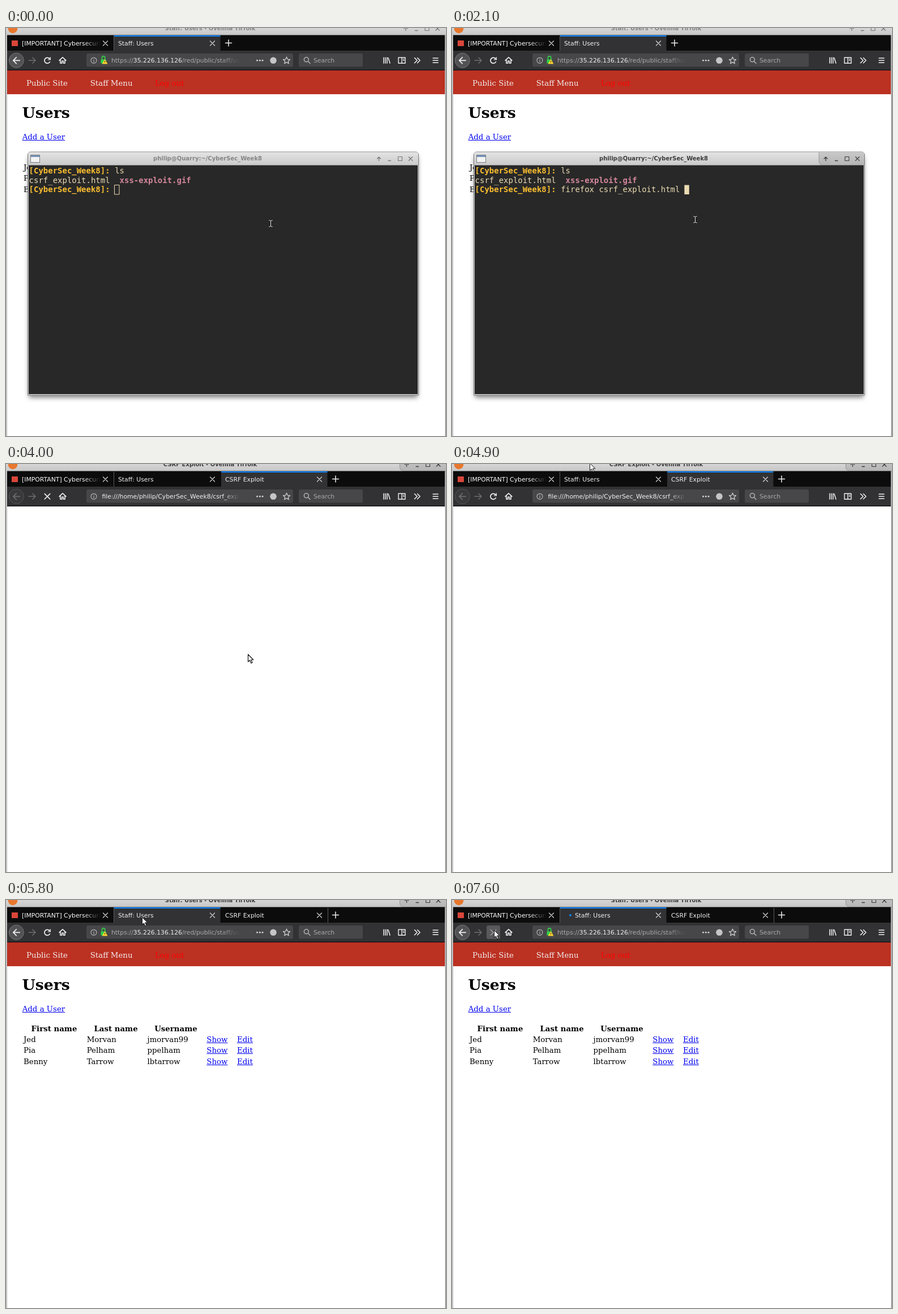
An HTML page with a canvas that plays this animation: 777 by 721 pixels, repeating every 8 s.

```html
<!DOCTYPE html>
<html lang="en">
<head>
<meta charset="utf-8">
<title>Desktop session</title>
<style>
html, body { margin: 0; width: 100%; height: 100%; overflow: hidden; background: #fff; }
canvas { display: block; width: 777px; height: 721px; }
</style>
</head>
<body>
<canvas id="stage" width="777" height="721"></canvas>
<script>
const c = document.getElementById('stage').getContext('2d');
const LOOP = 8000;
const UI = '10.83px "DejaVu Sans", sans-serif';
const TITLE = 'bold 10px "DejaVu Sans", sans-serif';
const SERIF = '13.33px "DejaVu Serif", serif';
const MONO = '13.98px "DejaVu Sans Mono", monospace';
const BRAND = 'Ovelina Tirfolk';
const FOLDER = '/home/philip/CyberSec_Week8';
const COMMAND = 'firefox csrf_exploit.html ';
const LIGHT = '#f0f0f1', DIM = '#6c6c6f', BLUE = '#0a84ff';
const CELL = 8.42;

// Each list holds [start time, value...]; a value lasts until the next entry.
const typed = [[0, 0], [1100, 2], [1400, 5], [1600, 22], [2100, 26]];
const pointer = [
  [0, 427, 336], [4300, 427, 323], [4500, 416, 304], [4600, 404, 281],
  [4800, 330, 143], [4900, 243, -2], [5100, 240, -3], [5300, 240, 5],
  [5400, 240, 13], [5700, 240, 30], [6100, 181, 64], [6200, 131, 91],
  [6600, 81, 61], [6800, 74, 53]
];

function at(list, t) {
  let hit = list[0];
  for (const row of list) if (t >= row[0]) hit = row;
  return hit;
}

function rect(x, y, w, h, color) {
  c.fillStyle = color;
  c.fillRect(x, y, w, h);
}

function round(x, y, w, h, r, color, stroke) {
  c.beginPath();
  c.roundRect(x, y, w, h, r);
  if (color) { c.fillStyle = color; c.fill(); }
  if (stroke) { c.lineWidth = 1; c.strokeStyle = stroke; c.stroke(); }
}

function circle(x, y, r, color) {
  c.beginPath();
  c.arc(x, y, r, 0, 7);
  c.fillStyle = color;
  c.fill();
}

// Strokes an SVG path placed at x, y.
function icon(d, x, y, color, width = 1.5) {
  c.save();
  c.translate(x, y);
  c.strokeStyle = color;
  c.lineWidth = width;
  c.lineJoin = c.lineCap = 'round';
  c.stroke(new Path2D(d));
  c.restore();
}

function vertical(y0, y1, ...colors) {
  const g = c.createLinearGradient(0, y0, 0, y1);
  colors.forEach((col, i) => g.addColorStop(i / (colors.length - 1), col));
  return g;
}

function fade(x0, x1, rgb) {
  const g = c.createLinearGradient(x0, 0, x1, 0);
  g.addColorStop(0, `rgba(${rgb},1)`);
  g.addColorStop(1, `rgba(${rgb},0)`);
  return g;
}

// Draws text and returns where it ends.
function text(s, x, y, font, color, align = 'left') {
  c.font = font;
  c.fillStyle = color;
  c.textAlign = align;
  c.fillText(s, x, y);
  return x + c.measureText(s).width;
}

function link(s, x, y) {
  const end = text(s, x, y, SERIF, '#0000ee');
  rect(x, Math.round(y) + 1, end - x, 1, '#0000ee');
}

function windowButtons(x, y, focused) {
  const ink = focused ? '#3c3c3c' : '#777';
  if (focused) {
    round(x - 10.5, y - 14, 90, 25.5, [0, 0, 0, 7], vertical(y - 12, y + 12, '#c9c9c9', '#b4b4b4'), '#969696');
    x += 1.5;
  }
  icon('M0 3.5V-3M-3 0L0 -3L3 0', x, y, ink, 1.3);
  icon('M-2 3.5H2.5', x + 18.5, y, ink, 1.3);
  icon('M-3.5 -3.5H3.5V3.5H-3.5Z', x + 37.5, y, ink, 1.1);
  icon('M-3.3 -3.3L3.3 3.3M3.3 -3.3L-3.3 3.3', x + 56, y, ink, 1.3);
}

function magnifier(x, y) {
  icon('M3.4 -1.2A4 4 0 1 1 -4.6 -1.2A4 4 0 1 1 3.4 -1.2M2.4 2L6 5.5', x, y, '#b0b0b3', 1.6);
}

function tab(x, end, label, o) {
  if (o.active) {
    rect(x, 13, end - x, 28, '#323234');
    rect(x, 13, end - x, 2, BLUE);
  } else if (o.hover) {
    rect(x, 13, end - x, 27, '#252526');
  }
  text(label, x + 7 + (o.shift || 0), 31, UI, o.fade ? fade(o.fade - 26, o.fade + 2, '249,249,250') : LIGHT);
  if (o.dot) circle(x + 18, 27, 2, BLUE);
  icon('M-4 -4L4 4M4 -4L-4 4', end - 14, 27, '#d0d0d2', 1.3);
}

function toolbar(s) {
  rect(2, 40, 773, 35, '#323234');
  rect(2, 73.5, 773, 1.5, '#171718');

  c.beginPath();
  c.arc(18.3, 57.3, 13, 0, 7);
  c.fillStyle = s.site ? '#525255' : '#39393b';
  c.fill();
  c.lineWidth = 1;
  c.strokeStyle = s.site ? '#77777a' : '#555558';
  c.stroke();
  icon('M6 0H-5.5M0 -5.5L-5.5 0L0 5.5', 18.3, 57.3, s.site ? LIGHT : DIM, 1.7);
  icon('M-6 0H6M1 -5L6 0L1 5', 46, 57.3, DIM, 1.6);

  if (s.reloadHover) round(61, 45, 24, 24, 3, '#59595c');
  if (s.stop) icon('M-4.7 -4.7L4.7 4.7M4.7 -4.7L-4.7 4.7', 73, 57.3, s.site ? '#98989a' : LIGHT, 1.7);
  else {
    const col = s.fresh ? DIM : LIGHT;
    icon('M4.4 2.5A5 5 0 1 1 3.6 -3.4L5.3 -1.8', 73, 57.3, col, 1.7);
    icon('M5.5 -5.3V-1.2H1.5Z', 73, 57.3, col, 0.9);
  }
  icon('M-6 0L0 -5.5L6 0M-4 -1V5H-1.3V1H1.3V5H4V-1', 100, 57.3, LIGHT, 1.6);

  round(142, 45, 365, 23.5, 3, '#474749');
  if (s.fresh) {
    magnifier(155, 57);
    text(`file://${FOLDER}/csrf_exploit.html`, 169.5, 61.3, UI, LIGHT);
  } else {
    icon('M5 0A5 5 0 1 1 -5 0A5 5 0 1 1 5 0M0 -0.5V2.7M0 -2.6V-2.5', 155, 57.3, '#b4b4b7', 1.2);
    if (s.site) {
      icon('M-2.5 -1V-3A2.6 2.6 0 0 1 2.7 -3V-1', 172, 55.5, '#30d34a', 1.7);
      rect(167.5, 55.5, 9, 7, '#30d34a');
      c.fillStyle = '#ffd52e';
      c.fill(new Path2D('M174.5 55L179.5 63.5H169.5Z'));
      rect(174, 58, 1, 3, '#333');
      let x = text('https://', 186, 61.3, UI, '#a9a9ab');
      x = text('35.226.136.126', x, 61.3, UI, LIGHT);
      text('/red/public/staff/us', x, 61.3, UI, fade(380, 413, '169,169,171'));
    } else {
      text(`file://${FOLDER}/csrf_exp`, 169.5, 61.3, UI, fade(382, 413, '240,240,241'));
    }
    for (const x of [443.5, 448.3, 453]) circle(x, 57.3, 1.5, '#cfcfd1');
    circle(472, 57.3, 5.8, '#c5c5c7');
    icon('M0 -6L1.8 -2L6 -1.6L2.8 1.3L3.8 5.5L0 3.3L-3.8 5.5L-2.8 1.3L-6 -1.6L-1.8 -2Z', 495.5, 57.3, '#cfcfd1', 1.3);
  }
  round(517, 45, 113, 23.5, 3, '#474749');
  magnifier(531, 57);
  text('Search', 543, 61.3, UI, '#a9a9ab');

  icon('M-5 -5V5M-2 -5V5M1 -5V5M3 -4.5L6 5', 672, 57.3, LIGHT, 1.5);
  icon('M-6 -5H6V5H-6ZM0 -5V5M2.5 -2.4H4M2.5 0H4', 699, 57.3, LIGHT, 1.4);
  icon('M-4.5 -4.5L0 0L-4.5 4.5M0.5 -4.5L5 0L0.5 4.5', 726, 57.3, LIGHT, 1.6);
  icon('M-4.5 -4H4.5M-4.5 0H4.5M-4.5 4H4.5', 758.5, 57.3, LIGHT, 1.5);
}

function page() {
  rect(2, 75, 773, 42, '#bb3122');
  text('Public Site', 36, 101.5, SERIF, '#f3eeee');
  text('Staff Menu', 148.7, 101.5, SERIF, '#f3eeee');
  text('Log out', 263, 101.5, SERIF, '#ff0000');
  text('Users', 28.5, 159, 'bold 26.67px "DejaVu Serif", serif', '#000');
  link('Add a User', 28.7, 197);

  ['First name', 'Last name', 'Username'].forEach((h, i) =>
    text(h, [85, 194, 300][i], 231.5, 'bold ' + SERIF, '#000', 'center'));
  const people = [['Jed', 'Morvan', 'jmorvan99'], ['Pia', 'Pelham', 'ppelham'], ['Benny', 'Tarrow', 'lbtarrow']];
  people.forEach((row, i) => {
    const y = 251 + i * 19.3;
    row.forEach((s, k) => text(s, [31, 142.7, 249.5][k], y, SERIF, '#000'));
    link('Show', 354.3, y);
    link('Edit', 408, y);
  });
}

function browser(t) {
  const focused = t >= 3000, local = t >= 3000 && t < 5800;
  const fresh = t >= 3000 && t < 3200, named = t >= 3500;
  const site = !local;

  rect(0, 0, 777, 721, site || named ? '#fff' : '#f9f9fa');
  rect(0, 0, 777, 13, vertical(0, 13, '#d6d6d6', '#c6c6c6'));
  const head = site ? 'Staff: Users - ' : named ? 'CSRF Exploit - ' : '';
  text(head + BRAND, 360.5, 4.3, TITLE, focused ? '#3c3c3c' : '#858585', 'center');
  circle(12, 1, 8.3, '#e8772e');
  windowButtons(706, 1, focused);

  rect(2, 12.5, 773, 28, '#0c0c0d');
  icon('M190.5 14V39.5', 0, 0, '#5a5a5c', 1);
  rect(10, 22, 11, 10, '#d9463a');
  text('[IMPORTANT] Cybersecurity', 28, 31, UI, fade(138, 167, '249,249,250'));
  icon('M-4 -4L4 4M4 -4L-4 4', 175.5, 27, '#d0d0d2', 1.3);

  tab(191, 378.5, 'Staff: Users', {
    active: site, hover: t >= 5700,
    shift: t >= 7400 ? 19 : 0, dot: t >= 7600
  });
  let end = 378.5;
  if (focused) {
    end = fresh ? 565 : 567.5;
    const loading = t >= 3200 && t < 3800;
    tab(380, end, named ? 'CSRF Exploit' : FOLDER, {
      active: local, fade: named ? 0 : 540,
      shift: loading ? 19 : 0, dot: loading
    });
    if (site) rect(568, 14, 1, 26, '#5a5a5c');
  }
  icon('M-5.5 0H5.5M0 -5.5V5.5', end + 14.5, 26.5, LIGHT, 1.5);

  toolbar({
    site, fresh, reloadHover: t >= 6600,
    stop: (t >= 3200 && t < 3600) || (t >= 4000 && t < 4100) || t >= 7600
  });
  if (site) page();

  rect(0, 13, 1, 708, '#d2d2d2');
  rect(1, 13, 1, 708, '#b0b0b0');
  rect(775, 13, 1, 708, '#d2d2d2');
  rect(776, 13, 1, 708, '#8c8c8c');
}

function terminal(t) {
  const focused = t >= 300;
  c.save();
  c.shadowColor = 'rgba(0,0,0,.5)';
  c.shadowBlur = 9;
  c.shadowOffsetY = 4;
  round(40, 222, 687, 427, 4, '#777');
  c.restore();
  round(38.5, 219, 690, 430, [5, 5, 1, 1], '#d4d4d4', '#787878');
  round(39, 219.5, 689, 23, [4, 4, 0, 0], vertical(219, 243, '#e4e4e4', '#c9c9c9'));
  rect(43, 224, 17, 14, '#777b80');
  rect(44, 225, 15, 12, '#f3f3f3');
  rect(44, 225, 15, 3, '#7694bd');

  c.save();
  c.beginPath();
  c.roundRect(39, 219.5, 689, 23, [4, 4, 0, 0]);
  c.clip();
  windowButtons(658.5, 231, focused);
  c.restore();
  text('philip@Quarry:~/CyberSec_Week8', 356, 234, TITLE, focused ? '#3c3c3c' : '#858585', 'center');

  rect(40, 242.5, 687, 404.5, '#282828');
  const cream = '#ebdbb2', x = 40.6, start = x + 18 * CELL;
  for (const y of [257, 290.4]) text('[CyberSec_Week8]:', x, y, 'bold ' + MONO, '#fabd2f');
  text('ls', start, 257, MONO, cream);
  text('csrf_exploit.html', x, 273.7, MONO, cream);
  text('xss-exploit.gif', x + 19 * CELL, 273.7, 'bold ' + MONO, '#d3869b');
  const n = at(typed, t)[1];
  text(COMMAND.slice(0, n), start, 290.4, MONO, cream);
  const cx = start + n * CELL - 0.7;
  if (focused) rect(cx, 277.5, 8.4, 16.5, cream);
  else round(Math.round(cx) + 0.5, 277.5, 8.5, 16.5, 0, null, cream);
}

function beam(t) {
  const k = Math.min(5, Math.floor(t / 100)) / 5;
  const x = 467.5 - 38 * k, y = 345.5 - 7 * k;
  const d = 'M-3 -5.5H-1L0 -4.5L1 -5.5H3M0 -4.5V4.5M-3 5.5H-1L0 4.5L1 5.5H3';
  icon(d, x, y, '#151515', 2.4);
  icon(d, x, y, '#f4f4f4', 1);
}

function arrow(t) {
  const [, x, y] = at(pointer, t);
  const shape = new Path2D('M.5 .5V13.5L3.5 10.8L5.8 16L8 15L5.7 10H9.8Z');
  const dark = t < 4900 || (t >= 6100 && t < 6600);
  c.save();
  c.translate(x, y);
  c.lineWidth = dark ? 1.2 : 1;
  c.lineJoin = 'round';
  c.strokeStyle = '#111';
  c.fillStyle = '#fff';
  c.fill(shape);
  c.stroke(shape);
  c.restore();
}

function draw(t) {
  c.textBaseline = 'alphabetic';
  browser(t);
  if (t < 3000) {
    terminal(t);
    beam(t);
  } else {
    arrow(t);
  }
}

const begin = performance.now();
function tick() {
  draw((performance.now() - begin) % LOOP);
  requestAnimationFrame(tick);
}
draw(0);
requestAnimationFrame(tick);
</script>
</body>
</html>
```
